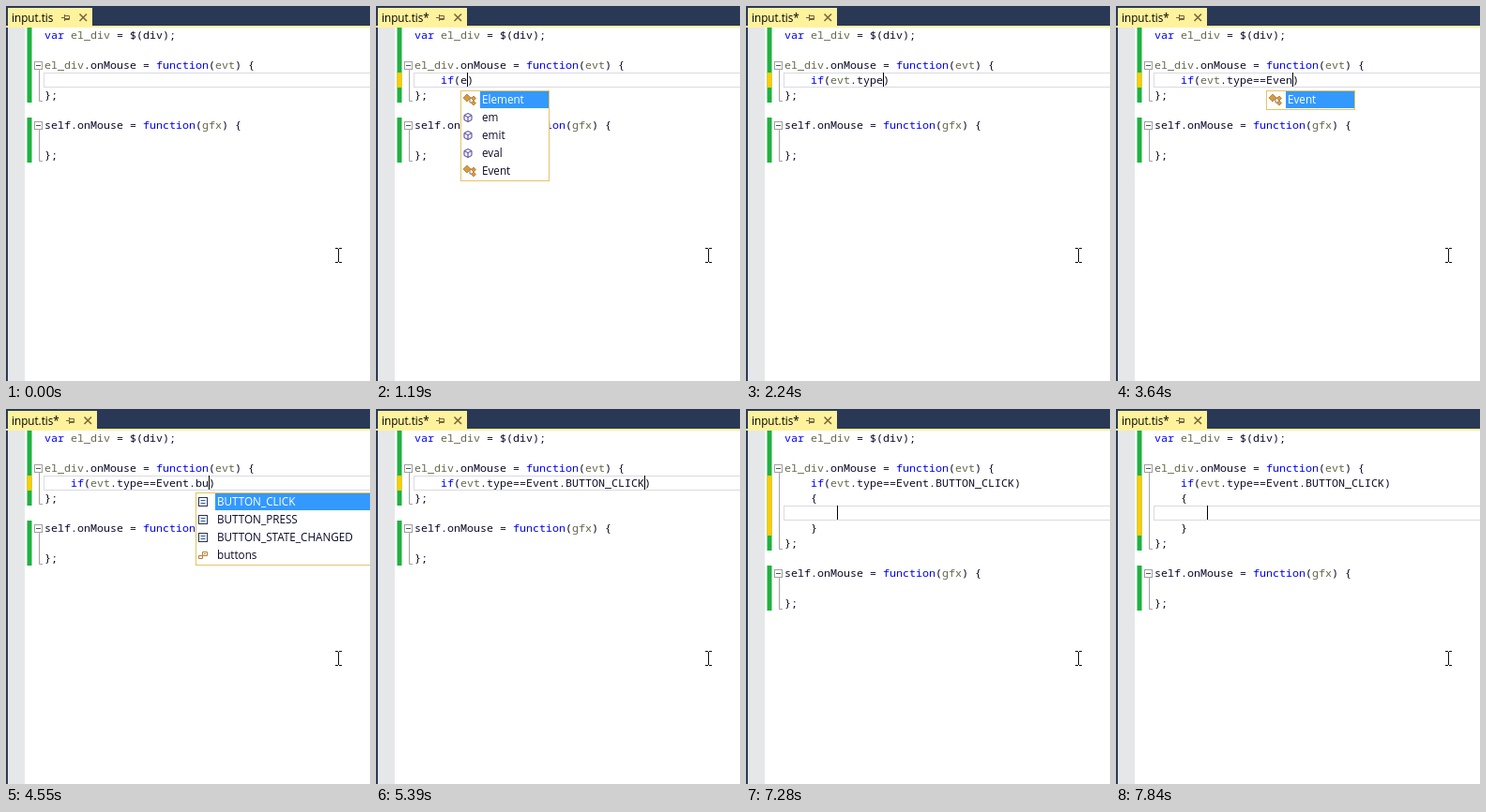
These frames come from a looping animation (388 px wide and 400 px high, 8000 ms). An HTML page:

```html
<!DOCTYPE html>
<html>
<head>
<meta charset="utf-8">
<style>
html, body { margin: 0; width: 100%; height: 100%; overflow: hidden; background: #fff; }
svg { display: block; }
text { white-space: pre; }
.code { font: 11.667px "Noto Sans Mono", monospace; }
.ui { font: 11.7px "Open Sans", sans-serif; }
</style>
</head>
<body>
<svg id="stage" width="388" height="400"></svg>
<script>
const LOOP = 8000, LEFT = 41, TOP = 23, CHAR = 7, ROW = 16, ITEM = 19;

const eWords = ['Element', 'em', 'emit', 'eval', 'Event'];
const buttons = ['BUTTON_CLICK', 'BUTTON_PRESS', 'BUTTON_STATE_CHANGED', 'buttons'];
const members = ['ACTIVATE_CHILD', 'ANIMATION', ...buttons, 'CHANGE', 'CLOSE_POPUP', 'CONTAINER_CLOSE_REQUEST'];
const cond = '    if(evt.type==Event.BUTTON_CLICK)';

// [start, edited lines, completion list]; | is a lit caret, ~ an unlit one
const steps = [
  [0, '    ~'],
  [140, '    |'],
  [630, '    i|'],
  [770, '    if|'],
  [980, '    if(|)'],
  [1190, '    if(e|)', eWords],
  [1260, '    if(ev|)', ['eval', 'Event', 'evt']],
  [1400, '    if(evt|)', ['evt']],
  [1540, '    if(evt.|)'],
  [1610, '    if(evt.|)', members],
  [1750, '    if(evt.t|)', ['target', 'type']],
  [1890, '    if(evt.ty|)', ['type']],
  [2030, '    if(evt.typ|)', ['type']],
  [2170, '    if(evt.type|)', ['type']],
  [2240, '    if(evt.type|)'],
  [2450, '    if(evt.type=|)'],
  [2590, '    if(evt.type==|)'],
  [2940, '    if(evt.type==E|)', eWords],
  [3080, '    if(evt.type==Ev|)', ['eval', 'Event', 'evt']],
  [3220, '    if(evt.type==Eve|)', ['Event']],
  [3640, '    if(evt.type==Even|)', ['Event']],
  [3780, '    if(evt.type==Event|)', ['Event']],
  [3990, '    if(evt.type==Event.|)'],
  [4130, '    if(evt.type==Event.|)', members],
  [4410, '    if(evt.type==Event.b|)', buttons],
  [4550, '    if(evt.type==Event.bu|)', buttons],
  [4690, '    if(evt.type==Event.but|)', buttons],
  [4900, '    if(evt.type==Event.butt|)', buttons],
  [5180, cond.replace(')', '|)')],
  [5670, cond + '|'],
  [6090, cond + '\n        |'],
  [6300, cond + '\n    {|'],
  [6440, cond + '\n    {|}'],
  [7140, cond + '\n    {\n    |}'],
  [7210, cond + '\n    {\n    |\n    }'],
  [7280, cond + '\n    {\n        |\n    }'],
  [7350, cond + '\n    {\n        ~\n    }'],
  [7840, cond + '\n    {\n        |\n    }']
];

const rowY = r => TOP + r * ROW;
const colX = c => LEFT + c * CHAR;
const rect = (x, y, w, h, fill, more = '') =>
  `<rect x="${x}" y="${y}" width="${w}" height="${h}" fill="${fill}" ${more}/>`;
const path = (d, stroke, more = 'fill="none"') => `<path d="${d}" stroke="${stroke}" ${more}/>`;
const label = (x, y, s, fill, cls) => `<text class="${cls}" x="${x}" y="${y}" fill="${fill}">${s}</text>`;

function codeLine(s, row) {
  let out = '';
  for (const m of s.matchAll(/\w+|[^\w\s]+/g)) {
    const color = /^(var|function|if)$/.test(m[0]) ? '#0000ff'
      : /^(el_div|evt|gfx)$/.test(m[0]) ? '#66664a' : '#0a0a28';
    out += label(colX(m.index), rowY(row) + 12, m[0], color, 'code');
  }
  return out;
}

function fold(from, to) {
  const y = rowY(from) + 4.5, end = rowY(to) + 14.5;
  return rect(30.5, y, 8, 8, '#fff', 'stroke="#a0a0a0"') + path(`M32 ${y + 4}h5`, '#555') +
    path(`M35.5 ${y + 8}V${end}h3.5`, '#a5a5a5');
}

const bar = (from, to, fill) => rect(22.5, rowY(from), 5, (to - from) * ROW, fill);

function icon(name, x, y) {
  const at = s => `<g transform="translate(${x} ${y})">${s}</g>`;
  if (/^(Element|Event)$/.test(name))
    return at(path('M0 -2H6M2 -2V3H6', '#777') +
      path('M-1 -6L3 -2L-1 2L-5 -2ZM6 -4L8.5 -1.5L6 1L3.5 -1.5ZM6 1L8.5 3.5L6 6L3.5 3.5Z', '#b87820', 'fill="#d59a45" stroke-width=".8"'));
  if (/^e/.test(name))
    return at(path('M0 -4.5L4 -2.5V2.5L0 4.5L-4 2.5V-2.5ZM-4 -2.5L0 -.5L4 -2.5M0 -.5V4.5', '#4f4196', 'fill="#f3f0fc"'));
  if (/^[A-Z_]+$/.test(name))
    return at(rect(-4.5, -4.5, 9, 9, '#fff', 'stroke="#30304a"') + path('M-2.5 -1.5H2.5M-2.5 1.5H2.5', '#1c5fa8'));
  return at(path('M-.5 -3.5H4.5V.5H-.5ZM-4.5 .5H-.5V3.5H-4.5Z', '#b5803a', 'fill="#fff8e8"') +
    path('M1 -1.5H3', '#b5803a'));
}

function popup(list, x, y) {
  const w = list.some(s => s.length > 9) ? 239 : 95, h = list.length * ITEM + 2;
  let out = rect(x + .5, y + .5, w - 1, h - 1, '#fff', 'stroke="#e5c365"') +
    rect(x + 21, y + 1, w - (list === members ? 39 : 22), ITEM - 1, '#3399ff');
  list.forEach((s, i) => {
    const mid = y + 10 + i * ITEM;
    out += icon(s, x + 8, mid) + label(x + 23, mid + 4, s, i ? '#0a0a28' : '#fff', 'ui');
  });
  if (list === members) {
    const sx = x + w - 18;
    out += rect(sx, y + 1, 17, h - 2, '#e8e8ec') + rect(sx + 4, y + 18, 9, 40, '#c2c3c9') +
      path(`M${sx + 4} ${y + 12}h9l-4.5 -5zM${sx + 4} ${y + h - 12}h9l-4.5 5z`, 'none', 'fill="#868999"');
  }
  return out;
}

function tab(edited) {
  const dx = edited ? 5 : 0;
  return rect(0, 0, 388, 21, '#293955') + rect(0, 21, 388, 2, '#fff29d') +
    rect(2, 2, 90 + dx, 19, '#fff29d') +
    label(6, 17, 'input.tis' + (edited ? '*' : ''), '#000', 'ui') +
    `<g transform="translate(${dx})">` +
    path('M59 12.5H62M62.5 9V16M62.5 10.5H67.5V14.5H62.5M63 13.5H67', '#75633d') +
    path('M78.5 8.5L86 16M86 8.5L78.5 16', '#75633d', 'stroke-width="1.5"') + '</g>';
}

function draw([start, source, list]) {
  const edited = start >= 630, raw = source.split('\n');
  const at = raw.findIndex(s => /[|~]/.test(s)), col = raw[at].search(/[|~]/);
  const body = raw.map(s => s.replace(/[|~]/, '')), n = body.length;
  const row = 3 + at, y = rowY(row);
  const lines = ['var el_div = $(div);', '', 'el_div.onMouse = function(evt) {', ...body, '};', '',
    'self.onMouse = function(gfx) {', '', '};'];

  let out = rect(0, 0, 388, 400, '#fff') + rect(0, 0, 2, 400, '#293955') + rect(2, 23, 18, 377, '#e6e7e8') +
    tab(edited) + bar(0, 4 + n, '#1fb141') + bar(5 + n, 8 + n, '#1fb141');
  if (edited) out += bar(3, 3 + n, '#ffcc00');
  out += rect(40.5, y + .5, 360, 15, 'none', 'stroke="#dadae2"');
  if (raw[at].endsWith(')|'))
    out += [6, col - 1].map(c => rect(colX(c), y, CHAR, 15, '#dbe0cc')).join('');
  out += fold(2, 3 + n) + fold(5 + n, 7 + n) + lines.map(codeLine).join('');
  if (source.includes('|')) out += rect(colX(col), y, 1, 15, '#000');
  if (list) {
    const typed = raw[at].slice(0, col).match(/\w*$/)[0].length;
    // an even number of items rounds up by a pixel
    out += popup(list, colX(col - typed), y + ROW + 2 + list.length % 2);
  }
  // mouse pointer
  return out + path('M351 258.5h3M355 258.5h3M354.5 259V273M351 273.5h3M355 273.5h3', '#111');
}

const stage = document.getElementById('stage');
const origin = performance.now();
let shown;
function tick() {
  const t = Math.max(0, performance.now() - origin) % LOOP;
  const step = steps.findLast(s => s[0] <= t);
  if (step !== shown) stage.innerHTML = draw(shown = step);
  requestAnimationFrame(tick);
}
tick();
</script>
</body>
</html>
```
